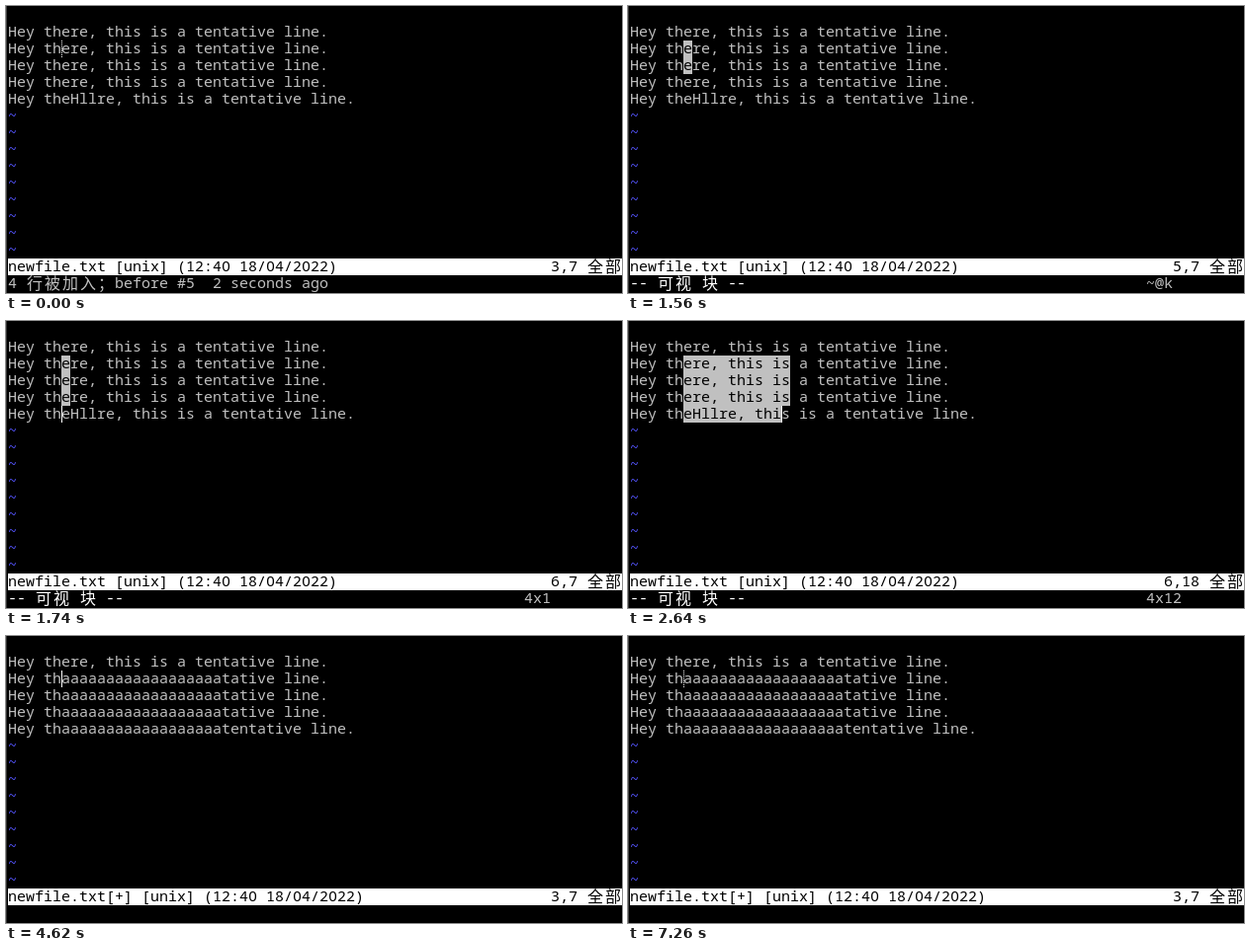
An HTML page that plays this animation: 623x291 px, repeating every 7.32 s.

```html
<!DOCTYPE html>
<html lang="zh">
<head>
<meta charset="utf-8">
<title>Block replace</title>
<style>
html, body { margin: 0; width: 100%; height: 100%; overflow: hidden; background: #000; }
svg { display: block; width: 623px; height: 291px; }
text { font: 15px "Noto Sans Mono", "DejaVu Sans Mono", monospace; white-space: pre; }
.zero { font-family: "Noto Sans", sans-serif; }
.wide { font: 16px "Noto Sans CJK SC", "Noto Sans CJK", sans-serif; }
</style>
</head>
<body>
<svg id="term" viewBox="0 0 623 291"></svg>
<script>
const LOOP = 7320, CW = 9, RH = 17, COLS = 69;
const GREY = "#c0c0c0", BLUE = "#5555ff";
const term = document.getElementById("term");

const px = col => 2 + col * CW;
const py = row => 1 + row * RH;

const plain = "Hey there, this is a tentative line.";
const odd = "Hey theHllre, this is a tentative line.";
const replaced = s => s.slice(0, 6) + "a".repeat(18) + s.slice(24);
const MODE = "-- 可视 块 --";

// Each step changes part of the screen state.
const steps = [
  [0, { row: 2, col: 6, caret: "dotted", msg: "4 行被加入；before #5  2 seconds ago" }],
  [180, { caret: "solid" }],
  [660, { visual: true, msg: MODE }],
  [1080, { row: 3 }],
  [1560, { row: 4, caret: "", cmd: "~@k" }],
  [1620, { row: 5, caret: "solid", flash: true }],
  [1740, { flash: false, cmd: "" }],
  [1860, { col: 7 }],
  ...Array.from({ length: 9 }, (_, k) => [2340 + 60 * k, { col: 8 + Math.round(15 * k / 8) }]),
  [3360, { caret: "" }],
  [3840, { caret: "solid" }],
  [4380, { cmd: "r" }],
  [4560, { row: 2, col: 6, visual: false, msg: "", cmd: "", edited: true }],
  [4620, { flag: "[+]" }],
  [5100, { caret: "" }],
  [5580, { caret: "solid" }],
  [6120, { caret: "" }],
  [6600, { caret: "solid" }],
  [7140, { caret: "" }],
  [7260, { caret: "dotted" }]
];

const rect = (x, y, w, h, fill) =>
  `<rect x="${x}" y="${y}" width="${w}" height="${h}" fill="${fill}"/>`;

// Write a string on the cell grid; wide characters take two cells.
function put(col, row, str, fill) {
  let out = "";
  for (const part of str.match(/[\u2e80-\uffef]|0|[^\u2e80-\uffef0]+/g) || []) {
    const wide = part > "\u2e80", zero = part === "0";
    const x = px(col) + (wide ? 1 : zero ? 0.2 : 0);
    const y = py(row) + (wide ? 14 : 13);
    const cls = wide ? ' class="wide"' : zero ? ' class="zero"' : "";
    out += `<text x="${x}" y="${y}" fill="${fill}"${cls}>${part}</text>`;
    col += wide ? 2 : part.length;
  }
  return out;
}

function draw(s) {
  const fg = s.flash ? "#000" : GREY;
  const bg = s.flash ? GREY : "#000";
  const bold = s.flash ? "#000" : "#fff";
  let out = rect(0, 0, 623, 291, "#000")
    + rect(0, 0, 1, 291, s.caret === "dotted" ? "#444" : "#333")
    + rect(1, 0, 622, 291, bg);

  for (let row = 1; row <= 5; row++) {
    const base = row === 5 ? odd : plain;
    const line = s.edited && row > 1 ? replaced(base) : base;
    const inBlock = s.visual && row >= 2 && row <= s.row;
    const end = !inBlock ? 6 : row === s.row ? s.col : s.col + 1;
    if (end > 6) {
      out += rect(px(6), py(row), (end - 6) * CW, RH, fg)
        + put(0, row, line.slice(0, 6), fg)
        + put(6, row, line.slice(6, end), bg)
        + put(end, row, line.slice(end), fg);
    } else {
      out += put(0, row, line, fg);
    }
  }
  for (let row = 6; row < 15; row++) out += put(0, row, "~", BLUE);

  const ruler = `${s.row + 1},${s.col + 1}`;
  const size = `${s.row - 1}x${s.col - 5}`;
  const label = `newfile.txt${s.flag || ""} [unix] (12:40 18/04/2022)`;
  out += rect(px(0), py(15), COLS * CW, RH, bold)
    + put(0, 15, label, bg)
    + put(64 - ruler.length, 15, ruler, bg)
    + put(65, 15, "全部", bg)
    + put(0, 16, s.msg, s.visual ? bold : fg);
  if (s.visual) out += put(58, 16, s.cmd || size, fg);

  if (s.caret) {
    const dash = s.caret === "dotted" ? ' stroke-dasharray="1 1"' : "";
    out += `<path d="M${px(s.col) + 0.5} ${py(s.row)}v${RH}" stroke="#fff"${dash}/>`;
  }
  term.innerHTML = out;
}

let shown = -1;
const start = performance.now();

function tick() {
  const t = Math.max(0, performance.now() - start) % LOOP;
  const count = steps.filter(([at]) => at <= t).length;
  if (count !== shown) {
    shown = count;
    draw(Object.assign({}, ...steps.slice(0, count).map(step => step[1])));
  }
  requestAnimationFrame(tick);
}
tick();
</script>
</body>
</html>
```
